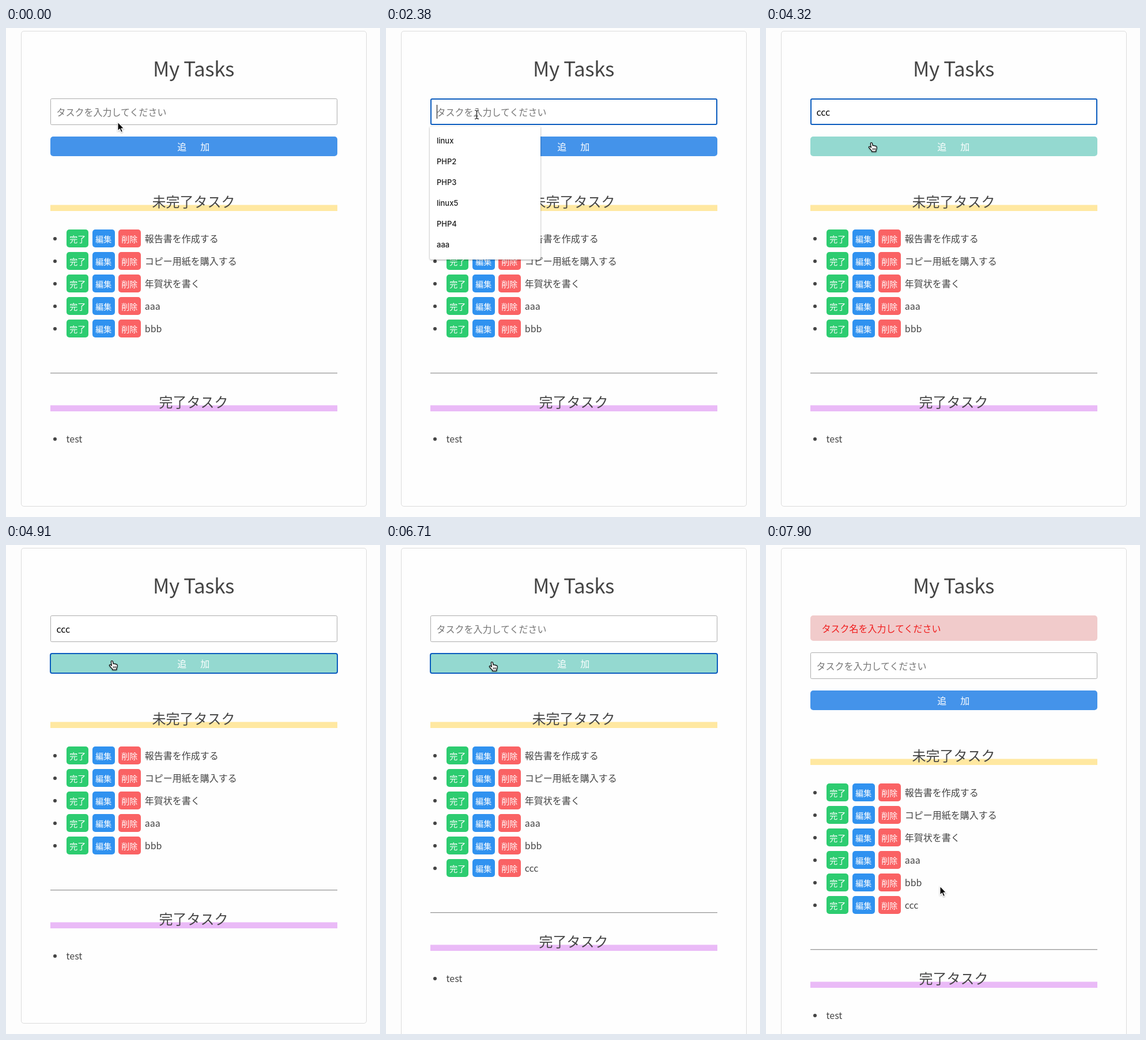
An HTML page that plays this animation: 649 px wide and 847 px high, repeating every 8000 ms.

```html
<!DOCTYPE html>
<html lang="ja">
<head>
<meta charset="utf-8">
<title>My Tasks</title>
<style>
  html, body { margin: 0; width: 100%; height: 100%; overflow: hidden; background: #fdfdfd; }
  svg { display: block; width: 649px; height: 847px; }
  text { font-family: "Noto Sans CJK JP", "Noto Sans CJK", "Noto Sans JP", sans-serif; font-size: 16px; fill: #444; }
  .title { font-size: 35px; font-weight: 500; text-anchor: middle; letter-spacing: -.4px; }
  .head { font-size: 24px; font-weight: 500; text-anchor: middle; }
  .tag { font-size: 14px; fill: #fff; text-anchor: middle; font-weight: 500; }
  .light { fill: #fff; }
  .hint { fill: #757575; }
  .typed { fill: #000; }
  .error { fill: #f01c1c; }
  .option { font-family: Inter, Roboto, sans-serif; font-size: 13px; font-weight: 500; fill: #1c1c1c; }
</style>
</head>
<body>
<svg viewBox="0 0 649 847">
  <defs>
    <filter id="shade" x="-10%" y="-10%" width="120%" height="120%">
      <feDropShadow dx="0" dy="1" stdDeviation="1.6" flood-opacity=".38"/>
    </filter>
    <filter id="soft" x="-50%" y="-50%" width="200%" height="200%">
      <feDropShadow dx="0" dy="1" stdDeviation=".8" flood-opacity=".35"/>
    </filter>
  </defs>
  <g id="page"></g>
  <g id="menu"></g>
  <g id="pointer"></g>
</svg>
<script>
const LOOP = 8000;
const HINT = 'タスクを入力してください';
const TASKS = ['報告書を作成する', 'コピー用紙を購入する', '年賀状を書く', 'aaa', 'bbb', 'ccc'];
const TAGS = [['完了', '#2dcc70', 105], ['編集', '#3092f0', 150], ['削除', '#fa6264', 195]];
const OPTIONS = ['linux', 'PHP2', 'PHP3', 'linux5', 'PHP4', 'aaa'];
const RING = '#0b5cbe';

// time, shape, hotspot x, hotspot y
const MOVES = [
  [0, 'arrow', 194, 163], [140, 'beam', 179, 142], [890, 'beam', 183, 135],
  [1040, 'beam', 157.5, 150], [4170, 'arrow', 168, 174], [4320, 'hand', 183, 199],
  [4470, 'hand', 183.5, 200], [4760, 'hand', 184, 201], [5960, 'hand', 184, 203],
  [7310, 'beam', 185, 203], [7460, 'hand', 200, 262], [7600, 'arrow', 236, 397],
  [7750, 'arrow', 280, 545], [7900, 'arrow', 302, 591]
];

const SHAPES = {
  arrow: `<path filter="url(#soft)" d="M0 0V15.2L3.5 12 5.9 17.6 8.5 16.5 6.1 11H10.8Z"
    fill="#000" stroke="#fff" stroke-width="1.1"/>`,
  beam: ['#fff" stroke-width="2.6', '#111" stroke-width="1.2'].map(c =>
    `<path d="M-3.5-7.5Q0-7.5 0-5Q0-7.5 3.5-7.5M0-5V5M-3.5 7.5Q0 7.5 0 5Q0 7.5 3.5 7.5M-2 2.5H2"
    fill="none" stroke="${c}"/>`).join(''),
  hand: `<g filter="url(#soft)"><path d="M-1.6 1Q-1.6-.4-.2-.4Q1.1-.4 1.4 1L2.3 5Q3.4 3.9 4.6 5.2
    Q6 4.3 7 5.8Q8.8 5.2 9.1 7.2Q9.5 10.5 7.9 12.8V15.2H.6V13.6Q-2.1 11.4-4.6 7.7
    Q-4.7 5.8-2.8 6.4L-.6 8.1Z" fill="#fff" stroke="#000" stroke-width="1.2" stroke-linejoin="round"/>
    <path d="M2.3 9V12.5M4.4 9V12.5M6.5 9V12.5" stroke="#000" stroke-width=".9"/></g>`
};

const rect = (x, y, w, h, fill, r = 0, extra = '') =>
  `<rect x="${x}" y="${y}" width="${w}" height="${h}" rx="${r}" fill="${fill}" ${extra}/>`;
const text = (x, y, str, cls = '') => `<text x="${x}" y="${y}" class="${cls}">${str}</text>`;
const dot = y => `<circle cx="85" cy="${y}" r="3" fill="#444"/>`;
const within = (t, a, b) => t >= a && t < b;

function heading(y, str, color) {
  return rect(77, y + 5.5, 498, 10.5, color) + text(325.5, y + 9, str, 'head');
}

function field(y, value, focused) {
  const box = focused
    ? rect(78, y + 1, 496, 44, '#fff', 2, `stroke="${RING}" stroke-width="2"`)
    : rect(77.5, y + .5, 497, 45, '#fff', 2, 'stroke="#adadad"');
  return box + text(87.5, y + 29.5, value || HINT, value ? 'typed' : 'hint');
}

function addButton(y, hover, focused) {
  const ring = focused ? `stroke="${RING}" stroke-width="2"` : '';
  return rect(77, y, 498, 34, hover ? '#94d9d0' : '#4493ea', focused ? 3 : 5, ring) +
    text(297.3, y + 24, '追', 'light') + text(337.3, y + 24, '加', 'light');
}

function task(name, y) {
  const tags = TAGS.map(([label, color, x]) =>
    rect(x, y - 16, x === 105 ? 38 : 39, 31, color, 5) + text(x + 19.2, y + 5.8, label, 'tag'));
  return dot(y) + tags.join('') + text(240.8, y + 5.6, name);
}

function page(s) {
  const top = s.error ? 64 : 0;
  const low = top + (s.count - 5) * 39;
  let out = rect(26.5, 5.5, 599, 823 + low, '#fefefe', 4.5, 'stroke="#dcdcdc"') +
    text(325.5, 83.5, 'My Tasks', 'title');
  if (s.error) {
    out += rect(77, 122, 498, 44, '#f1cbcb', 5) + text(96.5, 150.5, 'タスク名を入力してください', 'error');
  }
  out += field(122 + top, s.value, s.focus === 'field') +
    addButton(188 + top, s.hover, s.focus === 'button') +
    heading(301 + top, '未完了タスク', '#ffe8a1');
  out += TASKS.slice(0, s.count).map((name, i) => task(name, 365 + top + i * 39)).join('');
  out += rect(77, 597 + low, 498, 1, '#9a9a9a') + rect(77, 598 + low, 498, 1, '#dedede') +
    heading(648 + low, '完了タスク', '#eabaf7') + dot(712 + low) + text(104.5, 717.6 + low, 'test');
  if (s.caret) out += rect(s.value ? 87.5 + s.value.length * 8 : 88, 133, 1, 24, '#000');
  return out;
}

function state(t) {
  const typed = t < 2980 || t >= 5060 ? 0 : t < 3120 ? 1 : t < 3270 ? 2 : 3;
  return {
    value: 'c'.repeat(typed),
    count: t < 5060 ? 5 : 6,
    error: t >= 6860,
    menu: within(t, 1340, 2980),
    focus: within(t, 1340, 4910) ? 'field'
      : within(t, 4910, 5060) || within(t, 6710, 6860) ? 'button' : '',
    hover: within(t, 4320, 5060) || within(t, 6110, 6860) || within(t, 7460, 7600),
    caret: within(t, 1340, 1790) || within(t, 2380, 2830) || within(t, 2980, 3870) || within(t, 4470, 4910)
  };
}

const layer = id => document.getElementById(id);
const put = (el, html) => { if (el.last !== html) el.innerHTML = el.last = html; };

const menu = `<path d="M76 171H268V397Q268 401 264 401H80Q76 401 76 397Z" fill="#fff" filter="url(#shade)"/>` +
  OPTIONS.map((name, i) => text(88, 200 + i * 36, name, 'option')).join('');

function draw(t) {
  const s = state(t);
  const [, shape, x, y] = MOVES.filter(m => m[0] <= t).pop();
  put(layer('page'), page(s));
  put(layer('menu'), s.menu ? menu : '');
  put(layer('pointer'), `<g transform="translate(${x} ${y})">${SHAPES[shape]}</g>`);
}

const start = performance.now();
function tick() {
  draw((performance.now() - start) % LOOP);
  requestAnimationFrame(tick);
}
draw(0);
requestAnimationFrame(tick);
</script>
</body>
</html>
```
